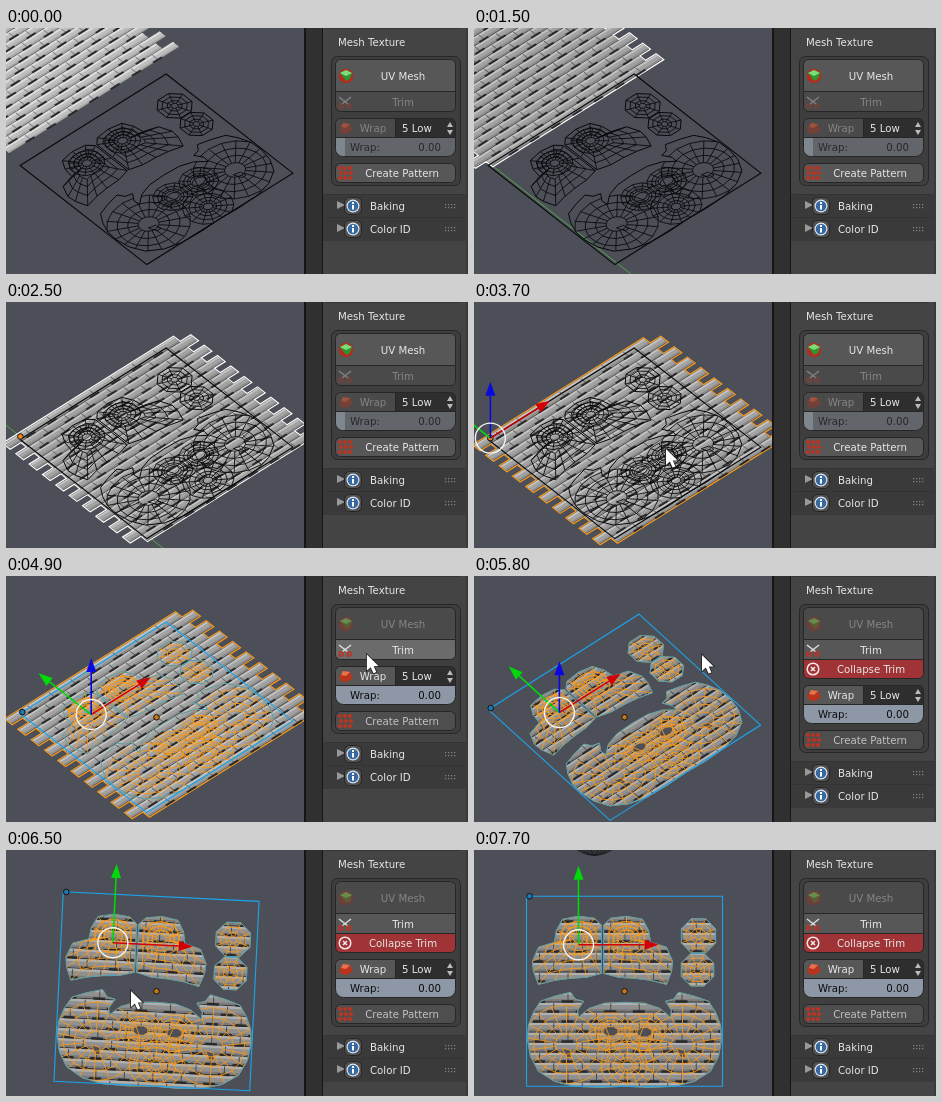
Recreate the animation shown at these times as an HTML page with a canvas. Size 462x246 px, loop 8.1 s.

```html
<!DOCTYPE html>
<html lang="en">
<head>
<meta charset="utf-8">
<title>Mesh texture trim</title>
<style>
html, body { margin: 0; overflow: hidden; background: #4d4f58; }
canvas { display: block; }
</style>
</head>
<body>
<canvas id="stage" width="462" height="246"></canvas>
<script>
const g = document.getElementById('stage').getContext('2d');
const LOOP = 8100, ORANGE = '#fb9a18', BLUE = '#1ba4ee', VIEW_W = 298;
const HALF_W = 98, HALF_H = 95;

// Linear interpolation over [time, value] pairs.
function track(t, keys) {
  if (t <= keys[0][0]) return keys[0][1];
  for (let i = 1; i < keys.length; i++) {
    const [t0, a] = keys[i - 1], [t1, b] = keys[i];
    if (t <= t1) return a + (b - a) * (t - t0) / (t1 - t0);
  }
  return keys[keys.length - 1][1];
}

// ---------- orthographic camera ----------
let cosA, sinA, sinE, cosE;
function aim(turn, tilt) {
  cosA = Math.cos(turn); sinA = Math.sin(turn);
  sinE = Math.sin(tilt); cosE = Math.cos(tilt);
}
const project = ([u, v, z = 0]) => [
  150.5 + u * cosA + v * sinA,
  141.3 + sinE * (v * cosA - u * sinA) - z * cosE
];

function trace(points, close = true) {
  points.forEach((p, i) => g[i ? 'lineTo' : 'moveTo'](...project(p)));
  if (close) g.closePath();
}
function rect(u0, v0, u1, v1) {
  trace([[u0, v0], [u1, v0], [u1, v1], [u0, v1]]);
}
function paint(color, build) {
  g.fillStyle = color; g.beginPath(); build(); g.fill();
}
function ink(color, width, build) {
  g.strokeStyle = color; g.lineWidth = width; g.beginPath(); build(); g.stroke();
}

// ---------- unwrapped mesh ----------
const mirror = (pts, axis) => pts.map(([u, v]) => [2 * axis - u, v]);
const scaled = (pts, [cu, cv], k) => pts.map(([u, v]) => [cu + (u - cu) * k, cv + (v - cv) * k]);
const ngon = (u, v, ru, rv, n) => Array.from({ length: n }, (_, i) => {
  const a = (i + .5) * 2 * Math.PI / n;
  return [u + ru * Math.cos(a), v + rv * Math.sin(a)];
});

const ear = [[-23, -66], [-30, -73], [-46, -75], [-62, -72], [-68, -61], [-70, -49], [-86, -44],
  [-92, -30], [-91, -20], [-86, -7], [-70, -11], [-55, -13], [-38, -14], [-23, -18], [-23, -42]];
const cheek = [[0, 11], [-20, 12], [-35, 17], [-46, 26], [-47, 19], [-41, 10], [-49, 8], [-54, 1],
  [-70, 5], [-84, 10], [-91, 21], [-96, 34], [-97, 48], [-94, 65], [-86, 80], [-70, 90], [-50, 95],
  [-25, 96], [0, 95]];
const face = [...cheek, ...mirror(cheek, 0).slice(1, -1).reverse()];
const fans = [
  { pts: ear, hub: [-46, -53], rings: [.76, .55, .38] },
  { pts: mirror(ear, -22), hub: [2, -53], rings: [.76, .55, .38] },
  { pts: ngon(74, -55.5, 18.5, 18.5, 8), hub: [74, -55.5], rings: [.72, .42, .2] },
  { pts: ngon(73, -21.5, 17.5, 17.5, 8), hub: [73, -21.5], rings: [.72, .42, .2] }
];
const shapes = [...fans.map(f => f.pts), face];
const eyes = [[-14, 40], [20, 41]];
const holes = [
  ...eyes.map(([u, v]) => ngon(u, v, 8, 5, 8)),
  ...[-57, 57].map(u => [[u - 5, 57], [u + 3, 59], [u + 4, 66], [u - 1, 66]])
];

function web([u, v], radii, spokes) {
  const loops = radii.map(r => ngon(u, v, r, r * .9, spokes));
  loops.forEach(loop => trace(loop));
  loops[0].forEach((p, i) => trace([p, loops[loops.length - 1][i]], false));
}
function wires() {
  for (const { pts, hub, rings } of fans) {
    const loops = rings.map(k => scaled(pts, hub, k));
    loops.forEach(loop => trace(loop));
    pts.forEach((p, i) => trace([p, loops[loops.length - 1][i]], false));
  }
  web([-46, -53], [19, 14, 9, 5], 12);
  web([2, -53], [19, 14, 9, 5], 12);
  web([-58, 53], [44, 33, 22, 11], 18);
  web([58, 53], [44, 33, 22, 11], 18);
  eyes.forEach(eye => web(eye, [21, 16, 12, 9], 12));
  web([3, 74], [27, 20, 14, 9, 5], 14);
  holes.forEach(h => trace(h));
}
const outlines = () => shapes.forEach(s => trace(s));
const border = () => rect(-HALF_W, -HALF_H, HALF_W, HALF_H);

// ---------- brick pattern ----------
const ROWS = 20, PITCH = 10, BRICK = 28.5, PER_ROW = 8;
function bricks(du, dv, tone, edge) {
  const rows = Array.from({ length: ROWS }, (_, r) =>
    [du - 114 + r % 2 * BRICK / 2, dv - 99 + r * PITCH]);
  const length = BRICK * PER_ROW;
  const strip = (top, bottom) => () =>
    rows.forEach(([u, v]) => rect(u, v + top, u + length, v + bottom));
  const joints = (left, top, right, bottom) => () => rows.forEach(([u, v]) => {
    for (let i = 1; i < PER_ROW; i++)
      rect(u + i * BRICK + left, v + top, u + i * BRICK + right, v + bottom);
  });
  const gray = n => `rgb(${n},${n},${n})`;
  if (edge) ink(edge, 2.4, strip(0, PITCH));
  paint(gray(tone - 85), strip(0, PITCH));
  paint(gray(tone), strip(.4, 9));
  paint(gray(tone + 32), strip(.4, 2.8));
  paint(gray(tone - 22), strip(7, 9));
  paint(gray(tone - 70), joints(0, 1, 1, 9));
  paint('#29292b', joints(-6, 8, 6, 10.4));
}

// ---------- overlays ----------
function dot(p, color) {
  const [x, y] = project(p);
  const circle = () => g.arc(x, y, 2.8, 0, 7);
  paint(color, circle);
  ink('#111', 1, circle);
}
function gizmo(u, v) {
  const [x, y] = project([u, v]);
  const axis = (color, tip) => {
    const [tx, ty] = project(tip), dx = tx - x, dy = ty - y, len = Math.hypot(dx, dy);
    if (len < 14) return;
    const nx = dx / len, ny = dy / len, bx = tx - nx * 14, by = ty - ny * 14;
    ink(color, 1.6, () => { g.moveTo(x, y); g.lineTo(bx, by); });
    paint(color, () => {
      g.moveTo(tx, ty);
      g.lineTo(bx - ny * 5, by + nx * 5);
      g.lineTo(bx + ny * 5, by - nx * 5);
    });
  };
  axis('#00d80a', [u, v - 79]);
  axis('#d10006', [u + 80, v]);
  axis('#0908e0', [u, v, 79]);
  ink('#f4f4f4', 1.4, () => g.arc(x, y, 15, 0, 7));
}
function pointer(x, y) {
  const shape = [0, 0, 0, 16, 3.8, 12.6, 6.6, 18.6, 9.4, 17.4, 6.8, 11.6, 11.6, 11.4];
  const path = () => {
    for (let i = 0; i < shape.length; i += 2) g.lineTo(x + shape[i], y + shape[i + 1]);
    g.closePath();
  };
  ink('#222', 1.6, path);
  paint('#fff', path);
}

// ---------- side panel ----------
function label(text, x, y, color = '#e6e6e6', align = 'left') {
  g.font = '10.2px "DejaVu Sans", sans-serif';
  g.textAlign = align;
  g.fillStyle = color;
  g.fillText(text, x, y + 3.8);
}
function button(x, y, w, h, color, radii = 5) {
  const box = () => g.roundRect(x + .5, y + .5, w - 1, h - 1, radii);
  paint(color, box);
  ink('#262626', 1, box);
}
function dimmed(off, draw) {
  g.globalAlpha = off ? .38 : 1;
  draw();
  g.globalAlpha = 1;
}
function meshIcon(x, y) {
  paint('#b52b1b', () => g.arc(x, y, 7.2, 0, 7));
  paint('#2f9433', () => { g.moveTo(x - 6, y - 3); g.lineTo(x, y - 6); g.lineTo(x + 6, y - 3); g.lineTo(x + 4, y + 3); g.lineTo(x, y + 5); });
  paint('#7ddc78', () => { g.moveTo(x - 6, y - 3); g.lineTo(x, y - 6); g.lineTo(x + 6, y - 3); g.lineTo(x, y); });
}
function scissors(x, y) {
  ink('#ddd', 1.5, () => { g.moveTo(x - 6, y - 5); g.lineTo(x + 3, y + 2); g.moveTo(x + 6, y - 5); g.lineTo(x - 3, y + 2); });
  ink('#b3372a', 1.8, () => { g.arc(x - 4, y + 4, 2, 0, 7); g.moveTo(x + 6, y + 4); g.arc(x + 4, y + 4, 2, 0, 7); });
}
function brickIcon(x, y) {
  paint('#b8341c', () => { g.moveTo(x - 7, y + 1); g.lineTo(x - 3, y - 5); g.lineTo(x + 4, y - 4); g.lineTo(x + 7, y + 2); g.lineTo(x + 1, y + 6); g.lineTo(x - 5, y + 5); });
  paint('#e8714d', () => { g.moveTo(x - 5, y - 1); g.lineTo(x - 3, y - 5); g.lineTo(x + 4, y - 4); g.lineTo(x, y); });
}
function gridIcon(x, y) {
  for (let i = 0; i < 9; i++)
    paint('#b93421', () => g.arc(x - 5 + i % 3 * 5 + (i > 2 && i < 6 ? 1 : 0), y - 5 + (i / 3 | 0) * 5, 2.1, 0, 7));
}
function section(name, y) {
  paint('#999', () => { g.moveTo(331, y - 5); g.lineTo(339, y - 1); g.lineTo(331, y + 3); });
  button(338, y - 9, 18, 18, '#505050');
  paint('#dfe8f2', () => g.arc(347, y, 6.5, 0, 7));
  paint('#37689f', () => g.arc(347, y, 5.3, 0, 7));
  paint('#fff', () => { g.rect(346, y - 1, 2, 4.5); g.rect(346, y - 4, 2, 2); });
  label(name, 364, y);
  paint('#858585', () => {
    for (let i = 0; i < 8; i++) g.rect(439 + i % 4 * 3, y - 2 + (i >> 2) * 3, 1.2, 1.2);
  });
}
function panel(linked, trimmed, hover) {
  const drop = trimmed ? 19 : 0, faded = '#858585', lit = '#e6e6e6';
  const onLink = linked ? lit : faded;
  paint('#303030', () => g.rect(VIEW_W, 0, 19, 246));
  paint('#161616', () => { g.rect(VIEW_W, 0, 2, 246); g.rect(316, 0, 1, 246); });
  paint('#444', () => g.rect(317, 0, 145, 246));
  paint('#3a3a3a', () => g.rect(460, 0, 2, 246));
  paint('#363636', () => g.rect(319, 0, 135, 1));
  label('Mesh Texture', 332, 14);

  button(325, 28, 130, 130 + drop, '#3e3e3e', 6);
  button(329, 31, 121, 33, linked ? '#4a4a4a' : '#575757', [5, 5, 0, 0]);
  dimmed(linked, () => meshIcon(340, 48));
  label('UV Mesh', 397, 48, linked ? faded : lit, 'center');
  button(329, 63, 121, 21, hover ? '#6b6b6b' : linked ? '#575757' : '#4a4a4a', trimmed ? 0 : [0, 0, 5, 5]);
  dimmed(!linked, () => scissors(339, 74));
  label('Trim', 397, 74, onLink, 'center');
  if (trimmed) {
    button(329, 83, 121, 20, '#a03335', [0, 0, 5, 5]);
    ink('#f4e8e8', 1.5, () => {
      g.arc(339, 93, 5.8, 0, 7);
      g.moveTo(337, 91); g.lineTo(341, 95);
      g.moveTo(341, 91); g.lineTo(337, 95);
    });
    label('Collapse Trim', 397, 93, lit, 'center');
  }

  const y = 90 + drop;
  button(329, y, 61, 20, linked ? '#575757' : '#4a4a4a', [5, 0, 0, 0]);
  dimmed(!linked, () => brickIcon(340, y + 10));
  label('Wrap', 367, y + 10, onLink, 'center');
  button(389, y, 61, 20, '#2e2e2e', [0, 5, 0, 0]);
  label('5 Low', 396, y + 10);
  paint('#bbb', () => {
    g.moveTo(441, y + 9); g.lineTo(444, y + 4); g.lineTo(447, y + 9);
    g.moveTo(441, y + 12); g.lineTo(444, y + 17); g.lineTo(447, y + 12);
  });
  button(329, y + 19, 121, 20, linked ? '#8d97a6' : '#62666a', [0, 0, 8, 8]);
  if (!linked) paint('#7f878e', () => g.roundRect(330, y + 20, 9, 18, [0, 0, 0, 7]));
  const dark = linked ? '#0c0c0c' : '#26282a';
  label('Wrap:', 344, y + 29, dark);
  label('0.00', 435, y + 29, dark, 'right');

  button(329, y + 45, 121, 20, linked ? '#4e4e4e' : '#575757');
  gridIcon(339, y + 55);
  label('Create Pattern', 396, y + 55, linked ? '#c2c2c2' : lit, 'center');
  paint('#3a3a3a', () => g.rect(317, y + 76, 143, 47));
  paint('#333', () => { g.rect(319, y + 76, 139, 1); g.rect(319, y + 99, 139, 1); });
  section('Baking', 178 + drop);
  section('Color ID', 201 + drop);
}

// ---------- timeline ----------
const turnKeys = [[5700, .73], [5800, .695], [6500, -.049], [6600, -.05], [7000, -.005], [7300, 0]];
const tiltKeys = [[5700, .775], [5800, .863], [6400, 1.5], [7000, 1.55], [7300, Math.PI / 2]];
const slideKeys = [[1400, -216], [2000, -74], [2300, -14], [2500, -3], [2800, 0]];
const pointerX = [[3000, 235], [3700, 192], [4100, 192], [5000, 382], [5100, 382], [5600, 228], [5800, 228], [6500, 125], [7400, 125], [7700, 56]];
const pointerY = [[3000, 210], [3700, 147], [4100, 147], [5000, 70], [5100, 70], [5600, 79], [5800, 79], [6500, 141], [7400, 141], [7700, 247]];

function scene(t) {
  const picked = t >= 400, grabbed = t >= 1500 && t < 3000;
  const linked = t >= 3900, trimmed = t >= 5200;
  const slide = track(t, slideKeys), drift = -slide / 40;
  const origin = [-95, -HALF_H + slide];
  const px = track(t, pointerX), py = track(t, pointerY);
  aim(track(t, turnKeys), track(t, tiltKeys));

  g.fillStyle = '#4d4f58';
  g.fillRect(0, 0, 462, 246);
  g.save();
  g.beginPath(); g.rect(0, 0, VIEW_W, 246); g.clip();

  if (t >= 5800) {
    const [hx, hy] = project([-30, -148, 150]);
    paint('#34353b', () => g.ellipse(hx, hy, 22, 12, 0, 0, 7));
    ink('#17181b', .8, () => {
      for (let r = 4; r < 24; r += 5) { g.moveTo(hx + r, hy); g.ellipse(hx, hy, r, 12, 0, 0, 7); }
    });
  }
  if (grabbed) ink('#51a548', 1, () => trace([[-95, -150], [-95, 150]], false));

  if (trimmed) {
    g.save();
    g.beginPath(); outlines(); holes.forEach(h => trace(h)); g.clip('evenodd');
    bricks(0, 0, 144);
    g.restore();
  } else {
    const edge = grabbed ? '#fff' : picked ? ORANGE : null;
    bricks(drift, slide, picked ? 162 : 190, edge);
  }

  const line = linked ? ORANGE : '#08080a';
  g.save();
  g.beginPath(); outlines(); g.clip();
  ink(line, .85, wires);
  g.restore();
  ink(line, 1, outlines);
  if (linked) ink(BLUE, .8, outlines);
  ink(linked ? BLUE : '#08080a', 1.1, border);

  if (picked) dot(origin, linked ? '#1f78ae' : '#f08a1c');
  if (linked) dot([0, 0], '#c47716');
  if (t >= 3000) {
    if (linked) gizmo(-46, -46.5);
    else gizmo(...origin);
  }
  g.restore();

  panel(linked, trimmed, linked && t < 5300 && px > 329 && py < 84);
  if (t >= 3000 && t < 7700) pointer(px, py);
}

function tick() {
  const t = performance.now() % LOOP;
  scene(Math.floor(t / 100) * 100);
  requestAnimationFrame(tick);
}
tick();
</script>
</body>
</html>
```
